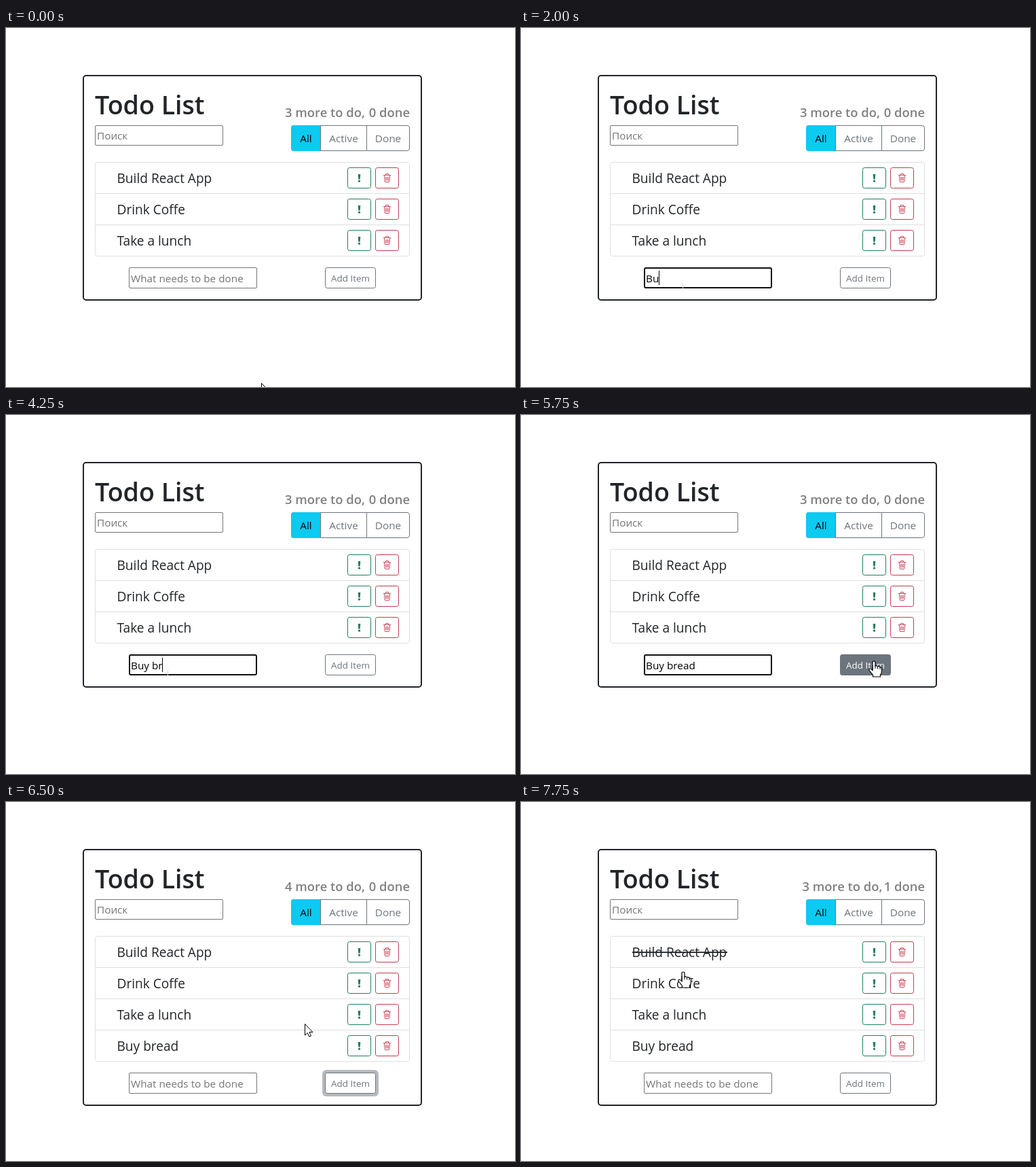
Write an HTML page that moves like this. It is 750 px wide and 528 px high and loops after 8 s.

```html
<!DOCTYPE html>
<html lang="en">
<head>
<meta charset="utf-8">
<title>Todo List</title>
<style>
html, body { margin: 0; width: 100%; height: 100%; overflow: hidden; background: #fff; }
svg { display: block; width: 750px; height: 528px; }
text { font-family: "Open Sans", "Noto Sans", sans-serif; white-space: pre; }
</style>
</head>
<body>
<svg id="stage" viewBox="0 0 750 528" xmlns="http://www.w3.org/2000/svg"></svg>
<script>
const stage = document.getElementById('stage');
const LOOP = 8000, STEP = 250;
const INK = '#212529', GREY = '#6c757d', HINT = '#757575';
const GREEN = '#1f7f5c', RED = '#c43c4e';

// Pointer per step: [from ms, shape, x, y]
const pointer = [
  [0, 'arrow', 376.5, 522.5], [250, 'arrow', 420.5, 440.5], [500, 'hand', 505, 362],
  [750, 'arrow', 300.5, 330.5], [1000, 'beam', 180, 369], [1500, 'beam', 238, 375],
  [5000, 'arrow', 340.5, 412.5], [5250, 'arrow', 466.5, 419.5], [5500, 'hand', 512, 372],
  [5750, 'hand', 520, 362], [6000, 'hand', 516.5, 364], [6250, 'hand', 514, 360],
  [6500, 'arrow', 440.5, 326.5], [6750, 'arrow', 340.5, 284.5], [7000, 'arrow', 262.5, 252.5],
  [7250, 'arrow', 230.5, 242.5], [7500, 'hand', 236, 226], [7750, 'hand', 239, 250]
];
const typing = [
  [0, ''], [1750, 'B'], [2000, 'Bu'], [2500, 'Buy'], [3250, 'Buy '], [3750, 'Buy b'],
  [4250, 'Buy br'], [4500, 'Buy brea'], [4750, 'Buy bread'], [6000, '']
];
const tasks = ['Build React App', 'Drink Coffe', 'Take a lunch', 'Buy bread'];

const at = (keys, t) => keys.filter(k => k[0] <= t).pop();

function text(s, x, y, size, fill, extra = '') {
  return `<text x="${x}" y="${y}" font-size="${size}" fill="${fill}" ${extra}>${s}</text>`;
}
function box(x, y, w, h, r, stroke, fill = '#fff', line = 1) {
  const i = line / 2;
  return `<rect x="${x + i}" y="${y + i}" width="${w - line}" height="${h - line}" rx="${r}"
    fill="${fill}" stroke="${stroke}" stroke-width="${line}"/>`;
}
function path(d, stroke, fill = 'none', line = 1) {
  return `<path d="${d}" fill="${fill}" stroke="${stroke}" stroke-width="${line}"/>`;
}
const middle = 'text-anchor="middle"', semi = 'font-weight="600"';

function header(left, done) {
  return text('Todo List', 131, 127, 37.6, INK, semi) +
    text(`${left} more to do,`, done ? 414.5 : 411, 131, 18.4, '#808080', semi) +
    text(`${done} done`, 595, 131, 18.4, '#808080', semi + ' text-anchor="end"') +
    box(131, 143, 189, 30, 1.5, '#767676') +
    text('Поиск', 134, 164, 15.3, HINT) +
    box(420, 143, 175, 38, 3.5, GREY) +
    path('M464 143H424Q420 143 420 147V177Q420 181 424 181H464Z', 'none', '#0dcaf0') +
    path('M463.5 143V181M531.5 143V181', GREY) +
    text('All', 442, 168, 15.3, '#000', middle) +
    text('Active', 497.5, 168, 15.3, GREY, middle) +
    text('Done', 563, 168, 15.3, GREY, middle);
}

function row(name, i, hover, struck) {
  const fill = ['#fff', '#75b798', '#198754'][hover];
  const mark = [GREEN, '#a9d2be', '#fff'][hover];
  return `<g transform="translate(0 ${i * 46})">` +
    (i ? path('M132 197.5H594', '#dfdfdf') : '') +
    text(name, 163.5, 228, 19.1, INK) +
    (struck ? `<rect x="164" y="220.2" width="140" height="1.8" fill="${INK}"/>` : '') +
    box(503, 205, 35, 31, 2.8, GREEN, fill) +
    path('M518.7 215H522.3L521.7 222.4H519.3Z', 'none', mark) +
    `<circle cx="520.5" cy="225.2" r="1.6" fill="${mark}"/>` +
    box(544, 205, 35, 31, 2.8, RED) +
    path('M556 216.5H567M559.5 216.5V214.5H563.5V216.5M557.4 217L558 225.5Q558.1 226.5 559 226.5' +
      'H564Q564.9 226.5 565 225.5L565.6 217M559.6 219V224.5M561.5 219V224.5M563.4 219V224.5', RED, 'none', 0.9) +
    '</g>';
}

function form(t, y) {
  const focus = t >= 1000 && t < 6000;
  const value = at(typing, t)[1];
  const pressed = t >= 6000 && t < 7500;
  const hover = t === 500 || t === 5500 || t === 5750;
  const fading = t === 6000;
  const fill = hover ? GREY : fading ? '#c4c7cc' : '#fff';
  const label = hover ? '#fff' : fading ? '#a1a6ab' : GREY;
  return (focus ? box(181, y, 189, 31, 2, '#101010', '#fff', 2) : box(181, y, 189, 31, 1.5, '#767676')) +
    (value ? text(value, 184, y + 22, 15.3, '#000', 'id="value"')
      : text('What needs to be done', 184, y + 22, 15.3, HINT)) +
    (focus && t < 5500 ? `<rect id="caret" x="184" y="${y + 5}" width="1" height="21" fill="#000"/>` : '') +
    (pressed ? `<rect x="466" y="${y - 4}" width="83" height="39" rx="6" fill="#b5babe"/>` : '') +
    box(470, y, 75, 31, 2.8, GREY, fill) +
    text('Add Item', 507.5, y + 21, 13.4, label, middle);
}

function cursor([, shape, x, y]) {
  const art = {
    arrow: path('M0 0V16.5L3.8 13L6.3 18.8L9 17.6L6.5 12H11.5Z', '#000', '#fff'),
    hand: path('M-2 2Q-2 0 0 0T2 2V7Q4 6 5.5 8Q8 7 9 9Q11.5 8.5 11.5 11V15Q11.5 18 9.5 20V23H-1.5V20.5' +
      'L-6.5 14Q-8 11.5 -6 11Q-4.5 11 -2 13.5Z', '#000', '#fff', 1.2) +
      path('M-2 13V6M2 6V11M5.5 8V11.5M9 9V12', '#000'),
    beam: path('M.5 0V8', '#d8d8d8')
  };
  return `<g transform="translate(${x} ${y})">${art[shape]}</g>`;
}

function draw(t) {
  const added = t >= 6000, done = t >= 7500;
  const count = added ? 4 : 3, end = 198 + count * 46;
  const hover = t === 6000 ? 1 : t === 6250 ? 2 : 0;
  stage.innerHTML =
    box(113, 69, 500, end + 65 - 69, 4, INK, '#fff', 2) +
    header(count - done, +done) +
    box(131, 197, 464, end - 197, 3.5, '#dfdfdf') +
    tasks.slice(0, count).map((s, i) => row(s, i, i === 3 ? hover : 0, done && !i)).join('') +
    form(t, end + 16) + cursor(at(pointer, t));
  const value = document.getElementById('value'), caret = document.getElementById('caret');
  if (value && caret) caret.setAttribute('x', Math.round(183.5 + value.getComputedTextLength()));
}

const start = performance.now();
let shown = -1;
function tick() {
  const t = Math.floor((performance.now() - start) % LOOP / STEP) * STEP;
  if (t !== shown) draw(shown = t);
  requestAnimationFrame(tick);
}
tick();
</script>
</body>
</html>
```
